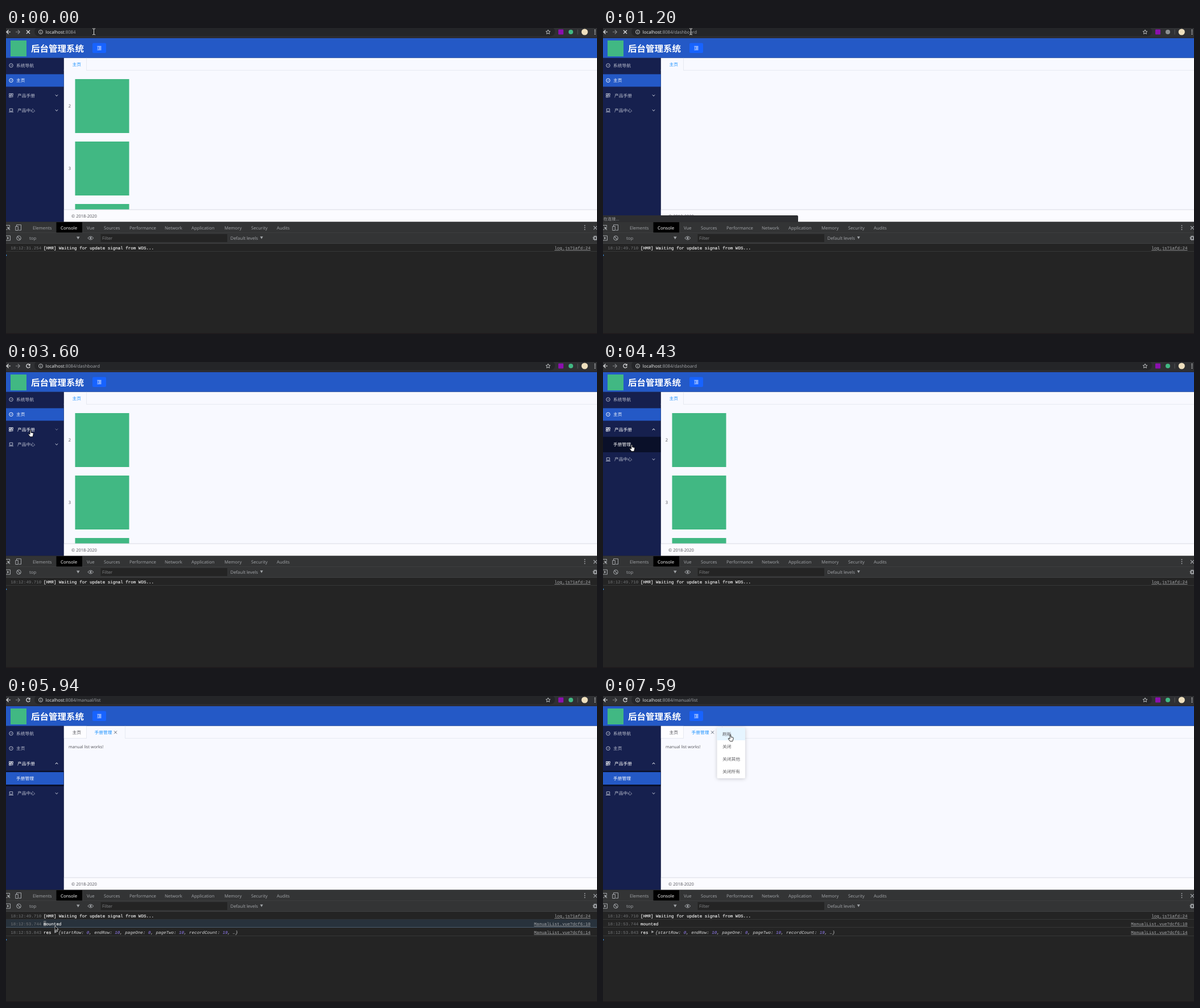
Animation of 1039 by 539 pixels, one loop 8000 ms. Source, as an HTML page:

```html
<!DOCTYPE html>
<html lang="zh">
<head>
<meta charset="utf-8">
<title>Admin console</title>
<style>
html, body { margin: 0; width: 100%; height: 100%; overflow: hidden; background: #242424; }
svg { display: block; width: 100%; height: 100%; }
text { font-family: "Open Sans", "Noto Sans CJK SC", "Noto Sans CJK", sans-serif; white-space: pre; text-rendering: geometricPrecision; }
.mono { font-family: "Liberation Mono", "Courier New", monospace; }
</style>
</head>
<body>
<svg id="stage" viewBox="0 0 1039 539" preserveAspectRatio="none"></svg>
<script>
const LOOP = 8000;
const BLUE = '#2459c6', GREEN = '#41b883', LINK = '#1890ff', PAGE = '#f8f9ff';
const MUTED = '#bfc3d2', INK = '#515156', TOOL = '#a3a6aa';

// Edges of the main areas
const TOP = 17.5, BODY = 52.6, SIDE = 101.6, TOOLS = 341.6;

// [first change, last change, number of changes]
const BURSTS = [[0, 0, 1], [280, 550, 3], [1200, 1350, 2], [1630, 1630, 1], [1910, 2910, 8],
  [3030, 4030, 8], [4160, 5000, 7], [5280, 6240, 8], [6390, 7350, 8], [7470, 7590, 2]];

// [time, x, y, pointer shape]
const PATH = [[0, 154.5, 6, 'beam'], [1909, 154.5, 6, 'beam'], [1910, 136, 40, 'arrow'],
  [2196, 64, 189, 'arrow'], [2482, 48, 370, 'arrow'], [2910, 96, 172, 'arrow'],
  [3029, 96, 172, 'arrow'], [3030, 90, 158, 'hand'], [3316, 60, 123, 'hand'],
  [3601, 43, 120, 'hand'], [3887, 45, 123, 'hand'], [4160, 48, 143, 'hand'],
  [4580, 52, 147, 'hand'], [4720, 160, 150, 'arrow'], [5000, 390, 136, 'arrow'],
  [5279, 390, 136, 'arrow'], [5280, 378, 160, 'arrow'], [5554, 230, 300, 'arrow'],
  [5966, 86, 405, 'arrow'], [6240, 92, 404, 'arrow'], [6389, 92, 404, 'arrow'],
  [6390, 118, 376, 'arrow'], [6800, 190, 180, 'arrow'], [7075, 184, 66, 'hand'],
  [7350, 173, 62, 'hand'], [7470, 203, 66, 'hand'], [7590, 224, 68, 'hand'], [8000, 224, 68, 'hand']];

const rect = (x, y, w, h, fill, extra = '') =>
  `<rect x="${x}" y="${y}" width="${w}" height="${h}" fill="${fill}" ${extra}/>`;
const dot = (x, y, r, fill) => `<circle cx="${x}" cy="${y}" r="${r}" fill="${fill}"/>`;
const ring = (x, y, r, color, w = 1) =>
  `<circle cx="${x}" cy="${y}" r="${r}" fill="none" stroke="${color}" stroke-width="${w}"/>`;
const line = (d, color, w = 1) =>
  `<path d="${d}" fill="none" stroke="${color}" stroke-width="${w}"/>`;
const shape = (d, fill) => `<path d="${d}" fill="${fill}"/>`;
const text = (x, y, s, fill, size = 7.75, extra = '') =>
  `<text x="${x}" y="${y}" fill="${fill}" font-size="${size}" ${extra}>${s}</text>`;
const mono = (x, y, s, fill, extra = '') => text(x, y, s, fill, 7.52, `class="mono" ${extra}`);
const span = (s, fill) => `<tspan fill="${fill}">${s}</tspan>`;

function snap(t) {
  let last = 0;
  for (const [a, b, n] of BURSTS) {
    if (t < a) break;
    const gap = n > 1 ? (b - a) / (n - 1) : 1;
    last = a + gap * Math.min(n - 1, Math.floor((t - a + 30) / gap));
  }
  return last;
}

function pointerAt(t) {
  let i = 0;
  while (i < PATH.length - 2 && PATH[i + 1][0] <= t) i++;
  const [t0, x0, y0, kind] = PATH[i], [t1, x1, y1] = PATH[i + 1];
  const k = (t - t0) / (t1 - t0);
  return { x: x0 + (x1 - x0) * k, y: y0 + (y1 - y0) * k, kind };
}

function browserBar(s) {
  const reload = s.loading
    ? line('M36 4l6 6M42 4l-6 6', '#e3e4e6', 1.2)
    : line('M41.6 4.8A3.3 3.3 0 1 0 42.2 8', '#e3e4e6', 1.2) + shape('M42.6 3v3.6h-3.6z', '#e3e4e6');
  return rect(0, 0, 1039, TOP, '#2f3033') + rect(50, -2, 915, 16.5, '#242528', 'rx="8"') +
    rect(0, TOP - 1.2, 1039, 1.2, '#2b2529') +
    line('M8 7H1M4.5 3.5L1 7l3.5 3.5', '#e3e4e6', 1.2) +
    line('M17 7h7M20.8 3.5L24.3 7l-3.5 3.5', '#85878a', 1.1) + reload +
    ring(61, 7, 3.5, '#d0d2d4', .9) + line('M61 6.5v2.6M61 4.8v.9', '#d0d2d4', .9) +
    text(69.7, 9.8, span('localhost', '#eeeff0') + span(':8084' + s.url, '#a4a7ab'), '', 7.85) +
    line('M953 3.2l1.1 2.5 2.7.3-2 1.8.6 2.7-2.4-1.4-2.4 1.4.6-2.7-2-1.8 2.7-.3z', '#cfd1d3', .9) +
    rect(971, 2.5, 9, 9, '#8b10ae', 'rx="1"') + dot(993, 7, 4, s.detected ? GREEN : '#8d9092') +
    rect(1004.6, 2.5, 1, 9, '#55575a') + dot(1017.3, 7, 5.6, '#eedfbd') +
    [3.8, 7.1, 10.4].map(y => dot(1035.5, y, 1, '#d5d6d8')).join('');
}

function gauge(y, color) {
  return ring(9, y, 3.3, color, .9) + line(`M9 ${y + 1}l1.7-2M7 ${y}h.7`, color, .8);
}

function chevron(y, turn, color) {
  const h = 1.3 - 2.6 * turn;
  return line(`M86.8 ${y - h}L89 ${y + h}l2.2 ${-2 * h}`, color, 1);
}

function sidebar(s) {
  const { x, y } = s.pointer;
  const over = (a, b) => x < SIDE && y > a && y < b;
  const group = over(107, 131) || s.open > 0 ? '#fff' : MUTED;
  const weight = group === '#fff' ? 'font-weight="500"' : '';
  const sub = 26.5 * s.open, last = 145 + sub;
  const home = s.manual ? MUTED : '#fff';
  const center = s.open === 0 && over(134, 157) ? '#fff' : MUTED;
  let out = rect(0, BODY, SIDE, TOOLS - BODY, '#16204e') +
    gauge(66, MUTED) + text(18, 68.9, '系统导航', MUTED);
  if (!s.manual) out += rect(0, 81.4, SIDE, 22, BLUE);
  out += gauge(92.3, home) + text(18, 95.2, '主页', home);
  out += [[5.7, 115.6], [9.6, 115.6], [5.7, 119.4]].map(([a, b]) =>
    `<rect x="${a}" y="${b}" width="2.6" height="2.6" fill="none" stroke="${group}" stroke-width=".9"/>`).join('') +
    line('M9.3 119.8h1.4M11.8 119v3M9.3 121.8h1.4', group, .9) +
    text(20, 121.6, '产品手册', group, 7.75, weight) +
    chevron(118.8, s.open, s.open === 0 && group === '#fff' ? '#6d7492' : group);
  if (s.open > 0) {
    const tint = s.manual || over(133, 157) ? '#fff' : MUTED;
    out += `<svg x="0" y="131.5" width="${SIDE}" height="${sub + 1}">` + rect(0, 0, SIDE, 28, '#0a1029') +
      (s.manual ? rect(0, 2.6, SIDE, 22, BLUE) : '') +
      text(18, 16.6, '手册管理', tint, 7.75, s.manual ? 'font-weight="500"' : '') + '</svg>';
  }
  return out + line(`M6.3 ${last - 2.8}h5.4v4.2h-5.4zM5 ${last + 3}h8`, center, .9) +
    text(20, last + 2.9, '产品中心', center) + chevron(last, 0, center);
}

function content(s) {
  const wide = 1039 - SIDE;
  let out = rect(SIDE, BODY, wide, TOOLS - BODY, PAGE) + rect(SIDE, 74, wide, 1, '#e6e9f1');
  if (s.manual) {
    out += rect(SIDE, BODY, 39.4, 21.4, '#fdfdff') + rect(141, BODY, 1, 21.4, '#e6e9f1') +
      rect(209, BODY, 1, 21.4, '#e6e9f1') + rect(142, 73.5, 67, 1.5, PAGE) +
      text(116.5, 66.6, '主页', INK) + text(155.5, 66.6, '手册管理', LINK) +
      line('M190.1 61.5l4.8 5M194.9 61.5l-4.8 5', '#4f5968', .9) +
      text(110, 92, 'manual list works!', INK, 7.25);
  } else {
    out += rect(SIDE, 73.5, 39.4, 1.5, PAGE) + rect(141, BODY, 1, 21.4, '#e6e9f1') +
      text(116.5, 66.6, '主页', LINK);
    if (s.pictures) {
      out += text(109.8, 140.4, '2', INK, 7.5) + rect(121.5, 90, 95, 95, GREEN) +
        text(109.8, 250.4, '3', INK, 7.5) + rect(121.5, 200, 95, 95, GREEN) +
        rect(121.5, 310, 95, 10, GREEN);
    }
  }
  return out + rect(SIDE, 320, wide, TOOLS - 320, '#fbfbff') + rect(SIDE, 319.5, wide, 1, '#d9dce4') +
    text(115, 333.8, '© 2018-2020', INK, 7.5);
}

function header() {
  return rect(0, TOP, 1039, BODY - TOP, BLUE) + rect(8, 22, 28, 28, GREEN) +
    text(44, 41.9, '后台管理系统', '#fff', 15.5, 'font-weight="700"') +
    rect(152, 26.5, 24, 17.5, '#1763ff', 'rx="2"') +
    line('M160.3 32.4h7.2M163 34.4h4.5M163 36.3h4.5M160.3 38.3h7.2', '#fff', .9) +
    shape('M160.3 35.3l1.7-1.3v2.6z', '#fff');
}

function contextMenu(s) {
  const { x, y } = s.pointer;
  const hot = x > 200 && y > 56 && y < 78;
  return rect(200.5, 55.5, 49.5, 89.5, '#fff', 'rx="2" style="filter:drop-shadow(0 1px 3px #0003)"') +
    (hot ? rect(200.5, 56, 49.5, 22, '#e6f5ff') : '') +
    ['刷新', '关闭', '关闭其他', '关闭所有'].map((s, i) => text(210, 70 + 22 * i, s, '#606064')).join('');
}

const TABS = [['Elements', 47], ['Console', 96], ['Vue', 142], ['Sources', 172], ['Performance', 217],
  ['Network', 279], ['Application', 326], ['Memory', 384], ['Security', 431], ['Audits', 476]];

function devtools() {
  return rect(0, TOOLS, 1039, 539 - TOOLS, '#242424') + rect(0, TOOLS, 1039, 379 - TOOLS, '#333435') +
    rect(0, 360, 1039, 1, '#3d3e3f') + rect(88.5, TOOLS + .5, 45.5, 18.2, '#000') +
    TABS.map(([name, x]) => text(x, 354.9, name, name === 'Console' ? '#fff' : TOOL)).join('') +
    line('M0 347.5h6.5v3M0 355h2', TOOL, 1) + shape('M2.3 350l5.4 2-2.3 1 2 2.2-1 .8-2-2.2-1 2z', TOOL) +
    line('M18.5 349v-2.3h8v9.5h-4M16.8 349.5h4.5v7h-4.5z', TOOL, 1) +
    [348, 351.5, 355].map(y => dot(1017.5, y, .9, TOOL)).join('') +
    line('M1033 349l6 6M1039 349l-6 6', TOOL, 1.1) +
    line('M0 366h7.5v8H0', TOOL, 1) + shape('M2 367.7l3.5 2.3-3.5 2.3z', TOOL) +
    ring(22.5, 370, 3.7, TOOL, 1.1) + line('M20 367.4l5 5.2', TOOL, 1.1) +
    text(41, 372.8, 'top', TOOL) + shape('M124 367.4h5.6l-2.8 4.8z', TOOL) +
    line('M143.8 370q5-6 10 0q-5 6-10 0z', TOOL, 1) + dot(148.8, 370, 1.7, TOOL) +
    rect(166.5, 363, 222.5, 14, '#242424') + text(169, 373, 'Filter', '#85878a') +
    text(394.5, 372.8, 'Default levels', TOOL) + shape('M446.8 367.2h5l-2.5 4.5z', TOOL) +
    ring(1036, 370, 2.6, TOOL, 1.8) +
    `<circle cx="1036" cy="370" r="3.9" fill="none" stroke="${TOOL}" stroke-width="1.2" stroke-dasharray="1.5 1.56"/>` +
    rect(0, 379, 1039, 1, '#404142') + rect(0, 537.5, 1039, 1.5, '#1f1a1c');
}

const pairs = [['startRow', 0], ['endRow', 10], ['pageOne', 0], ['pageTwo', 10], ['recordCount', 19]];
const preview = '{' + pairs.map(([k, v]) => k + ': ' + span(v, '#9980ff')).join(', ') + ', …}';

function logs(s) {
  const { y, kind } = s.pointer;
  const rows = [];
  if (s.stamp) rows.push([379.5, 14, s.stamp, '[HMR] Waiting for update signal from WDS...', 'log.js?1afd:24']);
  if (s.mounted) rows.push([393.5, 14, '18:12:53.744', 'mounted', 'ManualList.vue?dcf6:10']);
  if (s.result) rows.push([407.5, 15, '18:12:53.843', 'res', 'ManualList.vue?dcf6:14']);
  let out = '', end = 380;
  for (const [top, h, stamp, message, source] of rows) {
    const hot = kind === 'arrow' && y > top && y < top + h;
    const base = top + (h > 14 ? 11.2 : 10.6);
    if (hot) out += rect(0, top, 1039, h, '#28323c');
    if (hot && message === 'mounted') out += rect(66, top + 2.5, 4.5, 9.5, '#5b6167');
    out += rect(0, top + h - .5, 1039, 1, hot ? '#4b5b6b' : '#363737') +
      mono(8.2, base, stamp, '#747678') + mono(66, base, message, '#f2f2f2', 'stroke="#f2f2f2" stroke-width=".15"') +
      mono(1027.5, base, source, '#a9abad', 'text-anchor="end" text-decoration="underline"');
    if (message === 'res') {
      out += shape(`M85.3 ${base - 5.6}l4.2 2.3-4.2 2.3z`, '#a2a4a6') +
        mono(92, base, preview, '#d8d9da', 'font-style="italic"');
    }
    end = top + h;
  }
  return out + line(`M-1.5 ${end + 4.6}l2.4 2.2-2.4 2.2`, '#3d8fe0', 1.2);
}

function status() {
  return shape('M0 330h341q2 0 2 2v10H0z', '#2d2e31') + text(-6.4, 338.8, '正在连接...', '#a5a7aa', 7.2);
}

const BEAM = 'M-2.6-4.8h2L0-4l.6-.8h2M0-4v9M-2.6 5.8h2L0 5l.6.8h2';
const POINTERS = {
  beam: line(BEAM, '#000', 1.8) + line(BEAM, '#f2f2f2', 1),
  arrow: '<path d="M0 0v8.6l2-1.8 1.5 3.2 1.4-.7-1.5-3.1h2.7z" fill="#000" stroke="#fff" stroke-width=".7"/>',
  hand: '<path d="M-.9.8q.9-1.4 1.8 0v3.4l3.5.7q1 .3.8 1.4l-.7 3.2-.7 2.2h-4.4L-3.4 8q-.9-1.5.3-1.6l2.2 1z" fill="#fff" stroke="#000" stroke-width=".8"/>'
};

function stateAt(t) {
  return {
    pointer: pointerAt(t),
    loading: t < 1350,
    detected: t < 280 || t >= 1350,
    blank: t >= 410 && t < 1200,
    pictures: t < 410 || t >= 1350,
    connecting: t >= 280 && t < 1630,
    url: t < 1200 ? '' : t < 4575 ? '/dashboard' : '/manual/list',
    stamp: t < 410 ? '18:12:31.254' : t < 545 ? '' : '18:12:49.710',
    open: Math.min(1, Math.max(0, (t - 3750) / 400)),
    manual: t >= 4575,
    mounted: t >= 4575,
    result: t >= 4715,
    menu: t >= 7200
  };
}

const stage = document.getElementById('stage');
let shown = -1;

function draw(t) {
  const step = snap(t);
  if (step === shown) return;
  shown = step;
  const s = stateAt(step), p = s.pointer;
  const page = s.blank ? rect(0, TOP, 1039, TOOLS - TOP, '#fff') : content(s) + sidebar(s) + header();
  stage.innerHTML = page + (s.menu ? contextMenu(s) : '') + (s.connecting ? status() : '') +
    browserBar(s) + devtools() + logs(s) +
    `<g transform="translate(${p.x} ${p.y})">${POINTERS[p.kind]}</g>`;
}

const start = performance.now();
function tick() {
  draw((performance.now() - start) % LOOP);
  requestAnimationFrame(tick);
}
tick();
</script>
</body>
</html>
```
